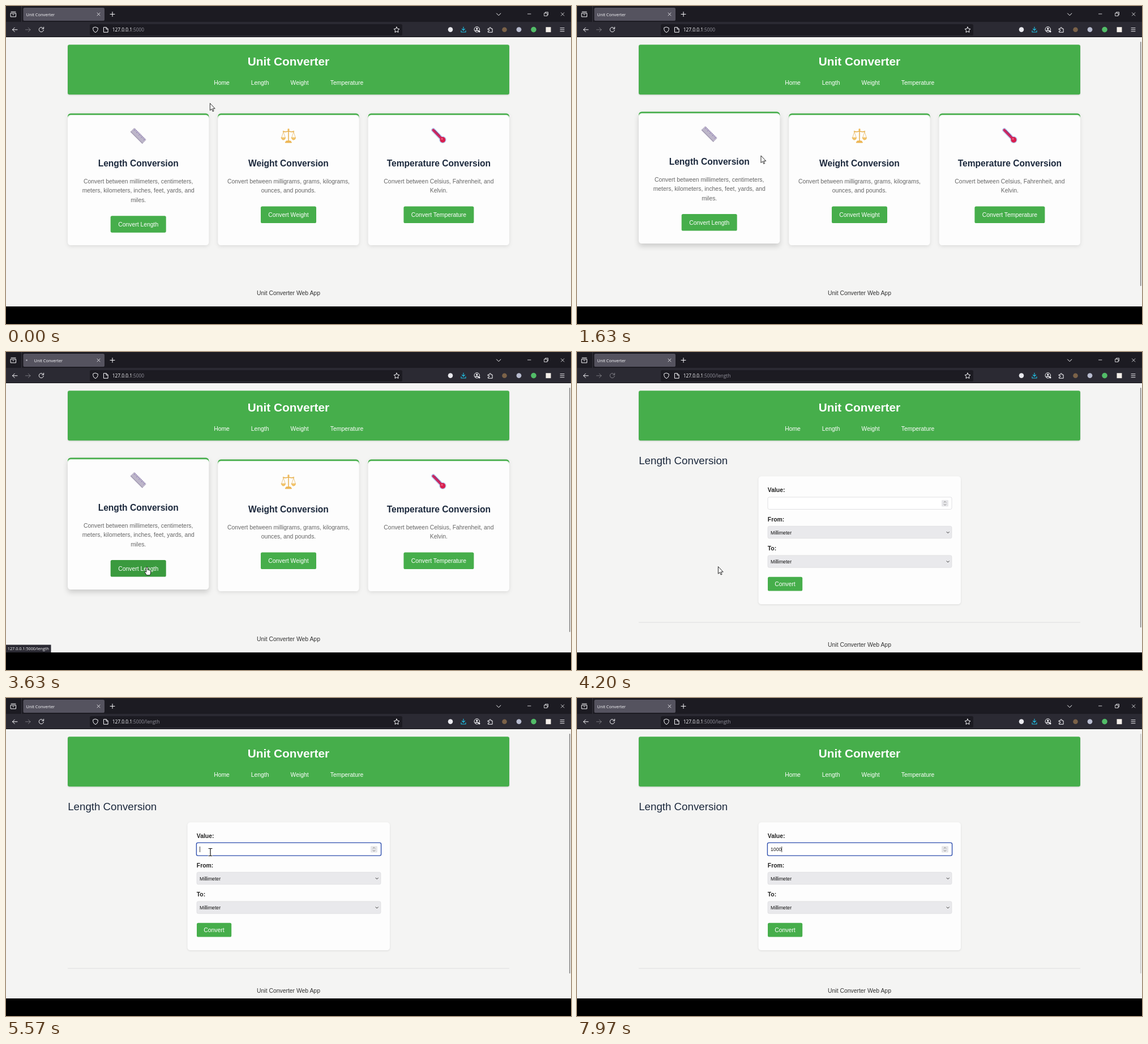
Recreate the animation shown at these times as an HTML page. Size 998x561 px, loop 8000 ms.

```html
<!DOCTYPE html>
<html lang="en">
<head>
<meta charset="utf-8">
<title>Unit Converter</title>
<style>
html, body { margin: 0; width: 100%; height: 100%; overflow: hidden; background: #000; }
svg { display: block; width: 100%; height: 100%; }
text { font-family: "Liberation Sans", Arial, sans-serif; font-size: 10.4px; white-space: pre; }
.ui { font-family: "Open Sans", "Noto Sans", sans-serif; fill: #fbfbfe; }
.line { fill: none; stroke: #fbfbfe; stroke-linecap: round; stroke-linejoin: round; }
</style>
</head>
<body>
<svg id="stage" viewBox="0 0 998 561"></svg>
<script>
const GREEN = '#46ae4b', NAVY = '#1c293d';
const stage = document.getElementById('stage');
const $ = id => document.getElementById(id);

const rect = (x, y, w, h, fill, r = 0, extra = '') =>
  `<rect x="${x}" y="${y}" width="${w}" height="${h}" rx="${r}" fill="${fill}" ${extra}/>`;
const text = (x, y, str, fill, extra = '') => `<text x="${x}" y="${y}" fill="${fill}" ${extra}>${str}</text>`;
const middle = (x, y, str, fill, extra = '') => text(x, y, str, fill, `text-anchor="middle" ${extra}`);
const sized = (px, more = '') => `style="font-size:${px}px;${more}"`;
const line = (d, width = 1, extra = '') => `<path class="line" d="${d}" stroke-width="${width}" ${extra}/>`;
const dot = (x, y, r, fill) => `<circle cx="${x}" cy="${y}" r="${r}" fill="${fill}"/>`;
const group = (id, content, extra = '') => `<g id="${id}" ${extra}>${content}</g>`;

const browser = () => [
  rect(0, 0, 998, 28, '#1c1b22'),
  rect(0, 28, 998, 27, '#2b2a33'),
  rect(0, 54, 998, 1, '#111015'),
  rect(27, 0, 1, 28, '#35343d'),
  rect(30.5, 3, 143.5, 23, '#55535f', 2.6),
  rect(148, 32, 552, 20, '#1c1b22', 2.6),
  // title bar
  line('M8.5 12.5h9v6.5h-9zM9 10.2h8M11.5 14.8q1.5 1.6 3 0'),
  group('spinner', dot(0, 14.5, 1.3, '#b9b8c2')),
  text(35.5, 17.6, 'Unit Converter', '#fbfbfe', `id="tabTitle" class="ui" ${sized(7.4)}`),
  line('M161 12l5 5m0-5l-5 5', .8),
  line('M184 14.5h8m-4-4v8'),
  line('M866.5 13l3.7 3.7 3.7-3.7'),
  line('M921.5 14h5.5M951 12.5h5v5h-5zM952.5 12.3v-1.5h5v5h-1.4M980.5 11.8l5.3 5.3m0-5.3l-5.3 5.3', .8),
  // navigation bar
  line('M20 41.8h-8.5m3.7-3.7l-3.7 3.7 3.7 3.7'),
  line('M34.5 41.8h8.5m-3.7-3.7l3.7 3.7-3.7 3.7', 1, 'opacity=".35"'),
  group('reload', line('M65.8 39.4a4.1 4.1 0 1 0 .6 3M66.6 37.2v3h-3')),
  line('M158 37.2l4.2 1.5v2.8q-.4 3.5-4.2 5.2-3.8-1.7-4.2-5.2v-2.8z'),
  line('M172.8 37.6h4.4l2.9 2.9v5.8h-7.3zM177 37.8v3h3'),
  `<text id="url" x="187.8" y="45.4" class="ui" ${sized(8.3)}>127.0.0.1<tspan id="path" fill="#92919b">:5000</tspan></text>`,
  line('M690 37l1.5 3.1 3.4.5-2.5 2.4.6 3.4-3-1.6-3 1.6.6-3.4-2.5-2.4 3.4-.5z'),
  dot(785, 41.6, 4.3, '#e9e9ee'),
  line('M808 37v6m-2.6-2.6l2.6 2.6 2.6-2.6M804 43.5v2.5h8v-2.5', 1.1, 'style="stroke:#1fc3e8"'),
  `<circle class="line" cx="831.8" cy="41.3" r="4.7"/>`, dot(831.8, 39.8, 1.6, '#fbfbfe'),
  line('M829 44q2.8-2.4 5.6 0', 1.4), dot(836, 45, 1.5, '#fbfbfe'),
  line('M851.5 40h2.4v-1a1.3 1.3 0 0 1 2.6 0v1h2.6v6.3h-7.6v-2.2h1.2a1.2 1.2 0 0 0 0-2.4h-1.2z'),
  dot(880.5, 41.8, 4.3, '#7b6248'),
  dot(906, 41.6, 4.4, '#b8bccf'),
  dot(932, 41.6, 4.8, '#52bd68'),
  rect(953.5, 37.2, 9, 9, '#f4efe9'),
  line('M979 38.7h7m-7 3h7m-7 3h7', .9)
].join('');

const header = () => [
  rect(109, 68.3, 780, 88, GREEN, 3.2, 'style="filter:drop-shadow(0 1px 1px #0002)"'),
  middle(499, 105, 'Unit Converter', '#fff', sized(20.8, 'font-weight:bold')),
  ...[['Home', 381], ['Length', 448.6], ['Weight', 518.7], ['Temperature', 602]]
    .map(([label, x]) => middle(x, 139.2, label, '#fff'))
].join('');

const ruler = () => {
  const ticks = Array.from({ length: 9 }, (_, i) => `M${-12 + i * 3}-5v${i % 2 ? 2.5 : 4}`).join('');
  return `<g transform="rotate(45)">${rect(-15, -5, 30, 10, '#bdb6c9', 1)}${rect(-15, 3.5, 30, 1.5, '#a69fb5', .5)}
    <path d="${ticks}" stroke="#7a63b0" stroke-width=".8"/></g>`;
};

const scales = () => `<g fill="none" stroke="#e8b04c" stroke-width="1.5" stroke-linecap="round">
  <path d="M0-11V9M-9.5-8Q-5-6 0-8.5 5-6 9.5-8"/>
  <path d="M-9-7l-3.2 10M-9-7l3.2 10M9-7l-3.2 10M9-7l3.2 10" stroke-width=".7"/>
  <path d="M-12.7 3.2h7.4q-.7 4-3.7 4t-3.7-4zM5.3 3.2h7.4q-.7 4-3.7 4t-3.7-4z" fill="#f3c56b" stroke-width=".7"/>
  <path d="M-3.5 9h7l2 3h-11z" fill="#f0b855" stroke-width="1"/></g>${dot(0, -11, 1.7, '#f0b855')}`;

const thermometer = () => `<g stroke-linecap="round">
  <path d="M-9.5-10L7 7" stroke="#b8cdf0" stroke-width="7.5"/>${dot(7, 7, 6.2, '#b8cdf0')}
  <path d="M-9.5-10L7 7" stroke="#cb2861" stroke-width="4.6"/>${dot(7, 7, 4.9, '#d81f4f')}
  <path d="M-6.5-9.5l8 8" stroke="#6c2a70" stroke-width="1.2" stroke-dasharray=".4 2.4"/></g>${dot(5.7, 5.5, 1.3, '#f47992')}`;

function card(id, x, name, icon, lines) {
  const cx = x + 124.7, width = name === 'Temperature' ? 124 : 98;
  const buttonY = 320.4 + lines.length * 16.6;
  return group(id, [
    rect(x, 189.6, 249.3, 12, GREEN, 5.2),
    rect(x, 192.3, 249.3, 229.7, '#fdfdfd', 5.2),
    `<g transform="translate(${cx} 229)">${icon}</g>`,
    middle(cx, 283.1, name + ' Conversion', NAVY, sized(15.6, 'font-weight:bold')),
    ...lines.map((str, i) => middle(cx, 312.8 + i * 16.6, str, '#666')),
    rect(cx - width / 2, buttonY, width, 29.5, GREEN, 2.6, `id="${id}Button"`),
    middle(cx, buttonY + 18.5, 'Convert ' + name, '#fff')
  ].join(''), 'style="filter:drop-shadow(0 2.5px 3px #0000001a)"');
}

const home = () => [
  card('length', 109, 'Length', ruler(),
    ['Convert between millimeters, centimeters,', 'meters, kilometers, inches, feet, yards, and', 'miles.']),
  card('weight', 374.3, 'Weight', scales(),
    ['Convert between milligrams, grams, kilograms,', 'ounces, and pounds.']),
  card('temperature', 639.7, 'Temperature', thermometer(),
    ['Convert between Celsius, Fahrenheit, and', 'Kelvin.']),
  middle(499, 510.2, 'Unit Converter Web App', '#333')
].join('');

const label = (y, str) => text(336.8, y, str, '#222', 'font-weight="bold"');
const select = y => rect(337, y, 325, 21.5, '#e9e9ec', 2.6, 'stroke="#dcdcdf" stroke-width=".7"') +
  text(342, y + 14.2, 'Millimeter', '#111', sized(8.67)) +
  line(`M653 ${y + 10}l2.2 2.2 2.2-2.2`, 1, 'style="stroke:#333"');

const form = () => [
  text(109.2, 198.2, 'Length Conversion', NAVY, sized(18.72)),
  rect(320.5, 219.3, 357.5, 225.8, '#fdfdfd', 5.2, 'style="filter:drop-shadow(0 1px 1.5px #0000001a)"'),
  label(247.2, 'Value:'), label(298.8, 'From:'), label(350.2, 'To:'),
  rect(337, 256, 325, 21.5, '#fff', 2.6, 'id="field"'),
  rect(644, 261.3, 12, 11.2, '#e6e6e9', 1),
  line('M648.2 265.3l1.8-1.8 1.8 1.8M648.2 268.6l1.8 1.8 1.8-1.8', .8, 'style="stroke:#666"'),
  text(342, 270.2, '', '#111', `id="value" ${sized(8.67)}`),
  rect(342, 262, .8, 10, '#111', 0, 'id="caret"'),
  select(307.3), select(358.8),
  rect(337, 396.7, 61.2, 24.8, GREEN, 2.6),
  middle(367.4, 412.8, 'Convert', '#fff'),
  rect(109, 476.6, 780, .8, '#d8d8da'),
  middle(499, 519.6, 'Unit Converter Web App', '#333')
].join('');

const pointers = () => `<g id="pointer" stroke-linejoin="round" stroke-linecap="round">
  <path id="arrow" d="M.4 0V12.2L3.2 9.6 5.2 14 7 13.2 5.1 9H8.8Z" fill="#fff" stroke="#111" stroke-width=".9"/>
  <path id="hand" d="M-1.2 9V1.2Q0-.8 1.2 1.2V5.5Q2.4 4.5 3.3 6 4.6 5.2 5.2 6.6 6.6 6.2 6.6 8V11Q6.2 13 5.2 14.7H-.6Q-1.6 12.5-3.8 9.7-4.2 8-2.6 8Z" fill="#fff" stroke="#111" stroke-width=".9"/>
  <g id="beam" fill="none"><path id="stem" d="M-3-6.5h2.2L0-6l.8-.5H3M0-6V6M-3 6.5h2.2L0 6l.8.5H3" stroke="#fff" stroke-width="2.6"/>
  <path d="M-3-6.5h2.2L0-6l.8-.5H3M0-6V6M-3 6.5h2.2L0 6l.8.5H3" stroke="#111" stroke-width="1.2"/></g></g>`;

stage.innerHTML = rect(0, 0, 998, 561, '#000') + rect(0, 54, 998, 476, '#f4f4f3') +
  browser() + header() + group('home', home()) + group('form', form()) +
  rect(994.9, 63, 1.6, 431, '#858585', .8, 'id="scrollbar"') +
  group('status', rect(0, 516.5, 79.5, 13.5, '#2b2a33') +
    text(2.8, 526.3, '127.0.0.1:5000/length', '#fbfbfe', `class="ui" ${sized(7.25)}`)) +
  pointers();

const clamp = v => Math.max(0, Math.min(1, v));
const progress = (t, start, end) => clamp((t - start) / (end - start));
const smooth = p => p * p * (3 - 2 * p);
const show = (id, on) => $(id).setAttribute('display', on ? 'inline' : 'none');
const set = (id, attrs) => { for (const key in attrs) $(id).setAttribute(key, attrs[key]); };

// time, x, y of the pointer
const route = [[0, 360, 172], [700, 360, 172], [1330, 347, 228], [2470, 262, 366], [2750, 249, 379],
  [4350, 249, 379], [5150, 361, 272], [8000, 361, 272]];

function pointerAt(t) {
  const i = route.findIndex(stop => stop[0] > t);
  const [t0, x0, y0] = route[i - 1], [t1, x1, y1] = route[i];
  const linear = progress(t, t0, t1), p = t0 > 4000 ? smooth(linear) : linear;
  return [x0 + (x1 - x0) * p, y0 + (y1 - y0) * p];
}

const LOADING = 3500, LOADED = 3850, FOCUS = 5350;
const KEYS = [6500, 6650, 6800, 6950];

function draw(t) {
  const onForm = t >= LOADED, loading = t >= LOADING && !onForm;
  show('home', !onForm);
  show('form', onForm);

  show('spinner', loading);
  set('spinner', { transform: `translate(${40 - 3.5 * Math.cos((t - 3630) / 120)} 0)` });
  set('tabTitle', { x: loading ? 49.5 : 35.5 });
  set('reload', { opacity: onForm && t < 4500 ? .4 : 1 });
  $('path').textContent = onForm ? ':5000/length' : ':5000';

  const lift = smooth(progress(t, 1310, 1610));
  set('length', { transform: `translate(0 ${lift ? .5 - 3.6 * lift : 0})` });
  $('length').style.filter = `drop-shadow(0 ${2.5 + 2.5 * lift}px ${3 + 2 * lift}px rgba(0,0,0,${.1 + .06 * lift}))`;
  const hover = progress(t, 2540, 2740);
  set('lengthButton', { fill: `rgb(${70 - 12 * hover},${174 - 20 * hover},${75 - 13 * hover})` });

  const [x, y] = pointerAt(t);
  const overLink = t >= 2520 && !onForm;
  const overField = onForm && x > 337 && y > 256 && y < 277.5;
  set('pointer', { transform: `translate(${x} ${y})` });
  show('pointer', t < KEYS[0]);
  show('hand', overLink);
  show('beam', overField);
  show('arrow', !overLink && !overField);
  show('status', overLink && t >= 2600);

  show('scrollbar', t >= 1380);
  set('scrollbar', { height: onForm ? 423 : 431, opacity: 1 - .6 * progress(t, 7800, 7970) });

  const focused = t >= FOCUS, typed = KEYS.filter(k => t >= k).length;
  set('field', focused
    ? { x: 336.4, y: 255.4, width: 326.2, height: 22.7, stroke: '#2f4fae', 'stroke-width': 1.4 }
    : { x: 337, y: 256, width: 325, height: 21.5, stroke: '#d9d9dc', 'stroke-width': .8 });
  $('value').textContent = '1000'.slice(0, typed);
  const blinkStart = typed ? KEYS[typed - 1] : FOCUS;
  show('caret', focused && (t - blinkStart) % 1000 < 500);
  set('caret', { x: 342.1 + typed * 4.82 });
}

function tick() {
  draw(performance.now() % 8000);
  requestAnimationFrame(tick);
}
tick();
</script>
</body>
</html>
```
